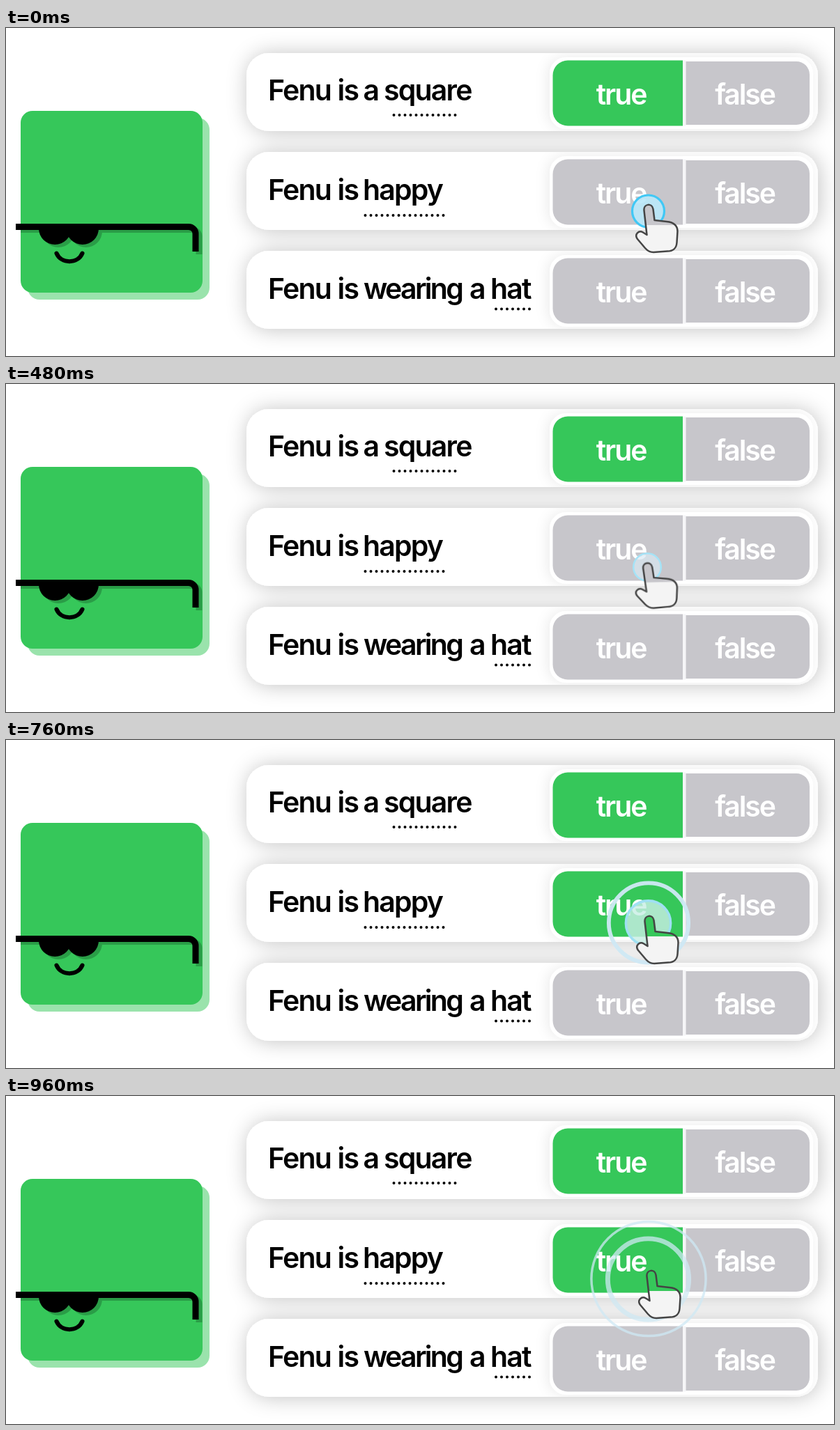
These frames come from a looping animation (1188 by 471 pixels, 1 s). An HTML page:

```html
<!DOCTYPE html>
<html lang="en">
<head>
<meta charset="utf-8">
<title>True or false</title>
<style>
  html, body { margin: 0; width: 100%; height: 100%; overflow: hidden; background: #fff; }
  svg { display: block; width: 1188px; height: 471px; --green: #36c75a; --gray: #c7c6cb; }
  text { font: 600 41px Inter, "Liberation Sans", sans-serif; letter-spacing: -1.8px; }
  .label { fill: #fff; text-anchor: middle; letter-spacing: -2.1px; }
  .tight { letter-spacing: -2.7px; }
  .dots { stroke: #000; stroke-width: 4; stroke-linecap: round; stroke-dasharray: 0 8; }
  .on { color: var(--green); }
  .off { color: var(--gray); }
  .flip { animation: flip 1s linear infinite; }
  .pulse { animation: pulse 1s linear infinite; }
  .wave { fill: none; stroke: #cfe9f5; animation: wave 1s linear infinite; }
  .hand { transform-origin: 935px 315px; animation: press 1s linear infinite; }

  @keyframes flip {
    0%, 59.9% { color: var(--gray); }
    60%, 100% { color: var(--green); }
  }
  @keyframes pulse {
    0%   { r: 23px; cx: 921.5px; stroke-width: 3.2px; fill: rgba(186,232,250,.9); stroke: rgb(65,200,245); }
    20%  { r: 23px; cx: 919.5px; stroke-width: 3px; fill: rgba(190,232,248,.88); stroke: rgb(85,208,245); }
    48%  { r: 19.8px; cx: 920px; stroke-width: 2.5px; fill: rgba(218,232,242,.7); stroke: rgb(165,227,247); }
    60%  { r: 17.5px; cx: 921.5px; stroke-width: 3px; fill: rgba(225,250,235,.2); stroke: rgba(215,248,228,.6); }
    76%  { r: 32px; cx: 921.5px; stroke-width: 3.5px; fill: rgba(200,238,228,.82); stroke: rgb(160,224,243); }
    88%  { r: 47px; cx: 921.5px; stroke-width: 7px; fill: rgba(220,245,235,.07); stroke: rgba(205,235,238,.68); }
    96%  { r: 58px; cx: 921.5px; stroke-width: 7px; fill: rgba(220,245,235,0); stroke: rgba(207,233,243,.75); }
    100% { r: 63px; cx: 921.5px; stroke-width: 6px; fill: rgba(220,245,235,0); stroke: rgba(207,233,243,.6); }
  }
  @keyframes wave {
    0%, 55% { r: 31px; opacity: 0; stroke-width: 7px; }
    60%  { r: 36px; opacity: .15; stroke-width: 6px; }
    76%  { r: 57px; opacity: .95; stroke-width: 5.8px; }
    88%  { r: 73.5px; opacity: .92; stroke-width: 4.5px; }
    96%  { r: 82px; opacity: .75; stroke-width: 3.5px; }
    100% { r: 86px; opacity: .65; stroke-width: 3px; }
  }
  @keyframes press {
    0%       { transform: none; }
    20%, 48% { transform: rotate(-1.5deg) scaleY(.95); }
    60%      { transform: none; }
    76%      { transform: translate(1px, -1px); }
    88%      { transform: translate(3px, -2.5px); }
    96%, 100% { transform: translate(4px, -3px); }
  }
</style>
</head>
<body>
<svg viewBox="0 0 1188 471">
  <defs>
    <filter id="soft" x="-10%" y="-20%" width="120%" height="140%">
      <feDropShadow dx="2" dy="1" stdDeviation="15" flood-opacity=".24"/>
    </filter>
    <filter id="lift" x="-10%" y="-30%" width="120%" height="160%">
      <feDropShadow dx="-3" dy="0" stdDeviation="9" flood-opacity=".08"/>
    </filter>
    <linearGradient id="skin" class="flip" gradientUnits="userSpaceOnUse" x1="0" y1="282.500" x2="0" y2="283.500">
      <stop offset="0" stop-color="currentColor"/>
      <stop offset="1" stop-color="#f4f4f4"/>
    </linearGradient>
    <clipPath id="card"><rect x="345" y="36" width="820" height="112" rx="32"/></clipPath>
    <rect id="panel" x="345" y="36" width="820" height="112" rx="32" fill="#fff"/>
    <g id="pair">
      <g clip-path="url(#card)">
        <rect x="780" y="42" width="378" height="103" rx="24" fill="#fff" filter="url(#lift)"/>
      </g>
      <path d="M971 46.500H806a21.500 21.500 0 0 0-21.500 21.500V119a21.500 21.500 0 0 0 21.500 21.500H971z" fill="currentColor"/>
      <path d="M971 46.500h4.500v94H971z" fill="#f5f5f7"/>
      <path d="M975.500 48H1134a19 19 0 0 1 19 19V120a19 19 0 0 1-19 19H975.500z" fill="#c7c6cb"/>
      <text class="label" x="882.500" y="110">true</text>
      <text class="label" x="1060" y="110">false</text>
    </g>
    <g id="shades">
      <path d="M14 285.500H262a10 10 0 0 1 10 10V321" fill="none" stroke="currentColor" stroke-width="9"/>
      <path d="M47 288a23.250 23 0 0 0 46.500 0zM86.500 288a23.250 23 0 0 0 46.500 0z" fill="currentColor"/>
    </g>
    <clipPath id="body"><rect x="21" y="119" width="261" height="261" rx="17"/></clipPath>
  </defs>

  <rect x="31" y="129" width="261" height="261" rx="17" fill="#36c75a" opacity=".5"/>
  <rect x="21" y="119" width="261" height="261" rx="17" fill="#36c75a"/>
  <g clip-path="url(#body)"><use href="#shades" x="5" y="4" color="#2a9d47"/></g>
  <use href="#shades" color="#000"/>
  <path d="M72.500 323.500C79 339 103 339 109.500 323.500" fill="none" stroke="#000" stroke-width="6" stroke-linecap="round"/>

  <g filter="url(#soft)">
    <use href="#panel"/>
    <use href="#panel" y="142"/>
    <use href="#panel" y="284"/>
  </g>
  <use href="#pair" class="on"/>
  <use href="#pair" class="flip" y="142"/>
  <use href="#pair" class="off" y="284"/>

  <text y="104"><tspan x="376">Fenu</tspan> <tspan x="475.500">is</tspan> <tspan x="512.500">a</tspan> <tspan x="542">square</tspan></text>
  <text y="247"><tspan x="376">Fenu</tspan> <tspan x="475.500">is</tspan> <tspan x="512">happy</tspan></text>
  <text y="389"><tspan x="376">Fenu</tspan> <tspan x="475.500">is</tspan> <tspan x="513" class="tight">wearing</tspan> <tspan x="665">a</tspan> <tspan x="695">hat</tspan></text>
  <path class="dots" d="M556.500 125H645.500M515.500 269H628M703 403.500H752"/>

  <circle class="wave" cx="922" cy="262.500"/>
  <circle class="pulse" cx="921.500" cy="263"/>
  <path class="hand" fill="url(#skin)" stroke="#444" stroke-width="2.500" stroke-linejoin="round"
    d="M919.500 297L915.500 262C914.500 252 927 251 928.500 260L930.500 276L948 278C958 279 963.500 283 963.500 292L962.500 308C962 316 957 320.500 949 320.500L929 322C924 322 920 319.500 917 316L906 303C901 296 908 290 914 293.500z"/>
</svg>
</body>
</html>
```
